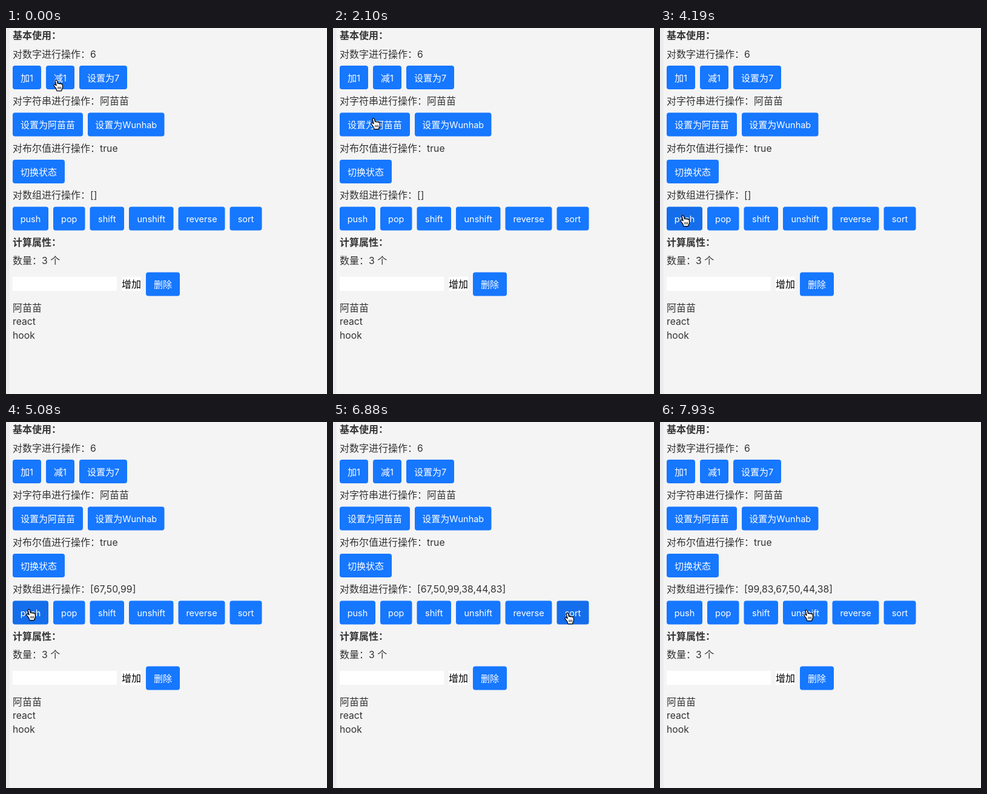
An HTML page for the animation above (8000 ms loop, 530 by 603 pixels).

```html
<!DOCTYPE html>
<html lang="zh-CN">
<head>
<meta charset="utf-8">
<style>
  html, body { margin: 0; width: 100%; height: 100%; overflow: hidden; background: #f4f4f4; }
  svg { display: block; font-family: Inter, "Noto Sans CJK SC", "Noto Sans CJK", sans-serif; }
  text { white-space: pre; }
  tspan { font-size: .985em; }
  .caption tspan { font-size: .965em; }
</style>
</head>
<body>
<svg id="stage" width="530" height="603" viewBox="0 0 530 603"></svg>
<script>
const LOOP = 8000, LEFT = 11, GAP = 8, PITCH = 77.5;
const BLUE = '#1677ff', PRESSED = '#146eeb';
const NICK = '阿苗苗', ALIAS = 'Wunhab';
const stage = document.getElementById('stage');

function add(tag, attrs) {
  const el = document.createElementNS('http://www.w3.org/2000/svg', tag);
  for (const k in attrs) el.setAttribute(k, attrs[k]);
  return stage.appendChild(el);
}

// Latin runs are set slightly smaller than the Chinese text.
function setText(el, str) {
  if (el.dataset.str === str) return;
  el.dataset.str = str;
  el.innerHTML = str.replace(/[ -~]+/g, '<tspan>$&</tspan>');
}

function label(x, mid, str, attrs) {
  const el = add('text', { x, y: mid + 5.6, 'font-size': 16, fill: '#333', ...attrs });
  setText(el, str);
  return el;
}

const boxes = {};
function button(x, y, width, str) {
  boxes[str] = add('rect', { x, y, width, height: 39, rx: 4, fill: BLUE });
  label(x + width / 2, y + 19.9, str,
    { class: 'caption', 'font-size': 15, fill: '#fff', 'text-anchor': 'middle' });
}

add('rect', { width: 6, height: 603, fill: '#ececec' });

// Each section: what it operates on, then its buttons with their widths.
const sections = [
  ['数字', { '加1': 47, '减1': 47, '设置为7': 79 }],
  ['字符串', { ['设置为' + NICK]: 116, ['设置为' + ALIAS]: 126.5 }],
  ['布尔值', { '切换状态': 86 }],
  ['数组', { push: 59, pop: 52.5, shift: 56.5, unshift: 73.5, reverse: 77, sort: 53 }]
];
const outputs = sections.map(([, buttons], i) => {
  const mid = 43 + i * PITCH;
  let x = LEFT;
  for (const [str, width] of Object.entries(buttons)) {
    button(x, mid + 19, width, str);
    x += width + GAP;
  }
  return label(LEFT, mid, '');
});

label(LEFT, 12.5, '基本使用：', { 'font-weight': 700 });
label(LEFT, 353, '计算属性：', { 'font-weight': 700 });
label(LEFT, 383.5, '数量：3 个');
add('rect', { x: LEFT, y: 410, width: 172, height: 23, fill: '#fff' });
add('rect', { x: 191, y: 410, width: 32, height: 23, fill: '#fff' });
label(191, 422, '增加', { fill: '#000' });
button(231, 402.5, 56, '删除');
[NICK, 'react', 'hook'].forEach((str, i) => label(LEFT, 461 + i * 22.5, str));

const hand = add('g', { stroke: '#000', 'stroke-width': 1.2, 'stroke-linejoin': 'round', fill: '#fff' });
hand.innerHTML = `<path d="M4.5 .7C3.4 .7 2.9 1.6 3.1 2.6L4.9 9.3 3.4 8.2C2 7.4 .5 8.3 1 9.6
  L4.6 14.2 5.6 17.8H12.8C13 15.8 14.6 14 14.8 12L14.4 7.6C14.2 6.3 12.6 6.3 12.4 7.2
  C12.1 5.8 10 5.6 9.8 6.8C9.4 5.5 7.4 5.4 7.2 6.4L6 1.9C5.8 1.1 5.2 .7 4.5 .7Z"/>
  <path d="M7.6 11.2V14.8M9.7 11.2V14.8M11.8 11.2V14.8" stroke-width=".9"/>`;

// Pointer moves between resting places.
const home = [78, 85];
const moves = [
  { from: 0, to: 900, at: [70, 161] },
  { from: 1050, to: 1200, at: [217, 157] },
  { from: 1350, to: 1650, at: [62, 148] },
  { from: 2100, to: 2550, at: [58, 230] },
  { from: 3300, to: 3450, at: [64, 249] },
  { from: 3450, to: 3900, at: [33, 308] },
  { from: 5530, to: 6730, at: [382, 314] },
  { from: 7030, to: 7330, at: [300, 316] },
  { from: 7780, to: 7930, at: [237, 309] }
];

// Clicks take effect on release; the button is dark for HOLD ms before.
const HOLD = 150;
const burst = (first, gap) => [0, 1, 2].map(i => first + i * gap);
const clicks = {
  push: [...burst(4200, 280), ...burst(5230, 150)],
  sort: [7030],
  reverse: [7780]
};
const values = [67, 50, 99, 38, 44, 83];

// The screen refreshes every 150 ms, slightly early in the second half.
function snap(t) {
  const shift = t < 4330 ? 0 : 20;
  return Math.floor((t + shift) / 150) * 150 - shift;
}

function pointer(t) {
  return moves.reduce((pos, { from, to, at }) => {
    const k = Math.min(1, Math.max(0, (t - from) / (to - from)));
    return pos.map((p, i) => p + (at[i] - p) * k);
  }, home);
}

function listAt(t) {
  const list = values.slice(0, clicks.push.filter(c => c <= t).length);
  if (t >= clicks.sort[0]) list.sort((a, b) => a - b);
  if (t >= clicks.reverse[0]) list.reverse();
  return list;
}

function draw(now) {
  const t = snap(now % LOOP);
  const results = [
    6,
    t >= 1350 && t < 2100 ? ALIAS : NICK,
    t < 2850 || t >= 3300,
    JSON.stringify(listAt(t))
  ];
  sections.forEach(([kind], i) => setText(outputs[i], `对${kind}进行操作：${results[i]}`));
  for (const name in clicks) {
    const down = clicks[name].some(c => t >= c - HOLD && t < c);
    boxes[name].setAttribute('fill', down ? PRESSED : BLUE);
  }
  hand.setAttribute('transform', `translate(${pointer(t)}) scale(1.05)`);
}

const start = performance.now();
function loop() {
  draw(performance.now() - start);
  requestAnimationFrame(loop);
}
loop();
</script>
</body>
</html>
```
